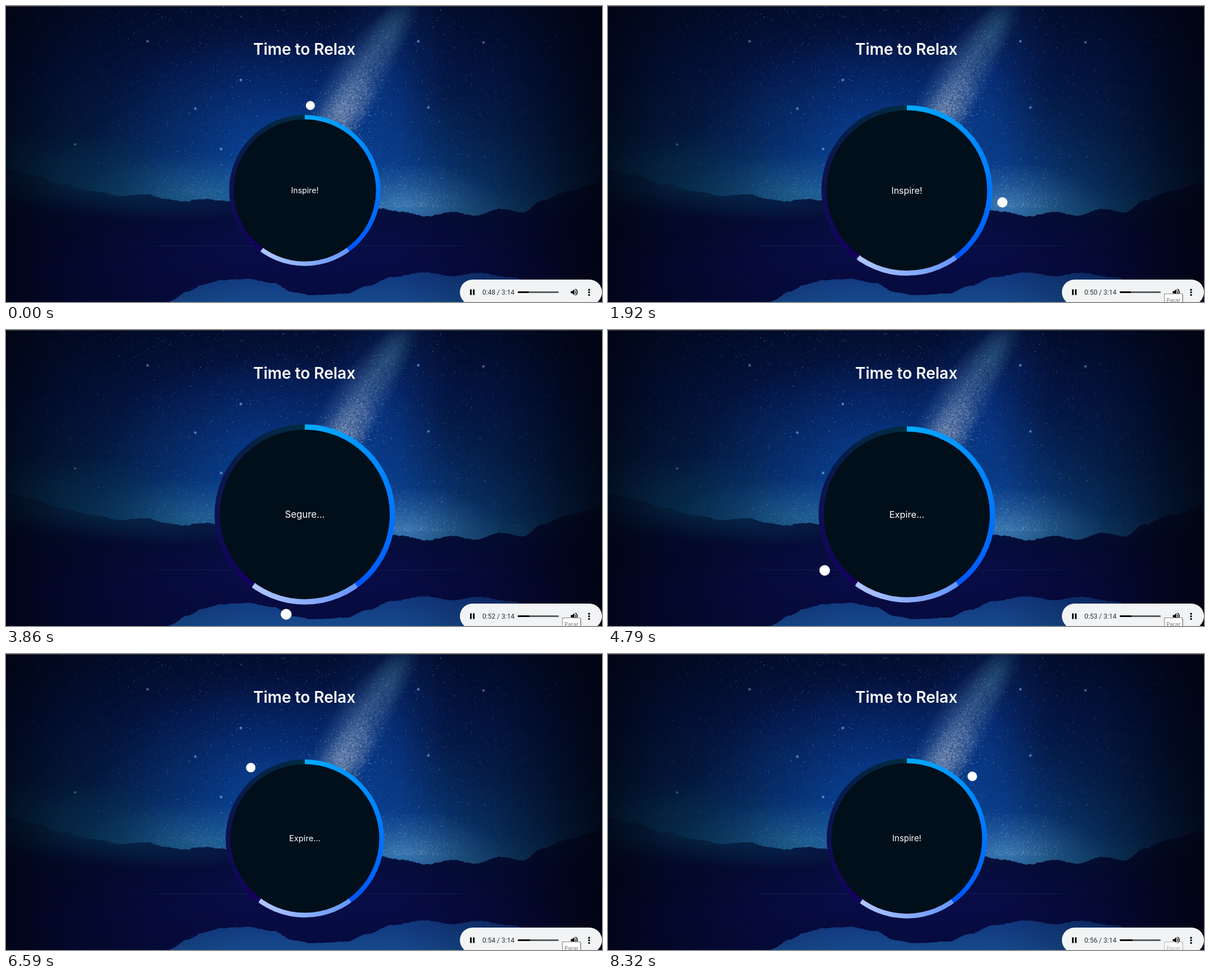
Write an HTML page with a canvas that moves like this. It is 1061x528 px and loops after 8390 ms.

```html
<!DOCTYPE html>
<html lang="en">
<head>
<meta charset="utf-8">
<title>Time to Relax</title>
<style>
  html, body { margin: 0; width: 100%; height: 100%; overflow: hidden; background: #020716; }
  #stage { position: relative; width: 1061px; height: 528px; overflow: hidden; font-family: Inter, sans-serif; color: #fff; }
  #stage * { position: absolute; box-sizing: border-box; white-space: nowrap; }
  h1 { left: 0; top: 60px; width: 1062px; margin: 0; text-align: center; font-size: 28px; line-height: 34px; font-weight: 600; }
  #breath { left: 531.7px; top: 328.7px; width: 0; height: 0; }
  .ring, .disc { border-radius: 50%; }
  .ring {
    left: -134.2px; top: -134.2px; width: 268.4px; height: 268.4px;
    background: conic-gradient(#00aaff 0%, #0055ff 40%, #6695fb 40%, #b0c6ff 60%, #15005c 60%, #002c40 100%);
  }
  .disc { left: -125.8px; top: -125.8px; width: 251.6px; height: 251.6px; background: #000f1a; }
  #word { left: -100px; top: -10px; width: 200px; text-align: center; font-size: 14px; line-height: 20px; }
  #hand { left: 0; top: 0; width: 0; height: 0; }
  #hand i { left: -8.4px; top: -159.4px; width: 16.8px; height: 16.8px; border-radius: 50%; background: #fff; }
  #player { left: 808px; top: 488px; width: 253px; height: 45px; border-radius: 22.5px; background: #f1f3f4; }
  #clock { left: 40px; top: 15px; font: 12px/16px Roboto, sans-serif; color: #303134; }
  .track { left: 103px; top: 21px; width: 73px; height: 3.4px; border-radius: 2px; background: #5b5c5d; }
  #played { left: 0; top: 0; height: 3.4px; border-radius: 2px; background: #000; }
  #player svg { left: 0; top: 0; }
  #tip { height: 22px; border: 1px solid #8a8a8a; background: #fff; color: #686868; font: 10px/23px "Open Sans", sans-serif; text-align: center; box-shadow: 1px 1px 2px #0004; }
</style>
</head>
<body>
<div id="stage">
  <canvas id="scene" width="1061" height="528"></canvas>
  <h1>Time to Relax</h1>
  <div id="breath">
    <div class="ring"></div>
    <div class="disc"></div>
    <div id="word"></div>
    <div id="hand"><i></i></div>
  </div>
  <div id="player">
    <svg width="253" height="45">
      <path d="M18 17.5h3v10h-3zM23.2 17.5h3v10h-3z"/>
      <path d="M197.5 20.5h2.8l3.5-3.5v11l-3.5-3.5h-2.8z"/>
      <path d="M205.3 20a3.2 3.2 0 0 1 0 5M205.3 17.2a5.6 5.6 0 0 1 0 10.6" fill="none" stroke="#000" stroke-width="1.4"/>
      <circle cx="230" cy="18.2" r="1.7"/><circle cx="230" cy="22.8" r="1.7"/><circle cx="230" cy="27.4" r="1.7"/>
    </svg>
    <div id="clock"></div>
    <div class="track"><div id="played"></div></div>
  </div>
  <div id="tip"></div>
</div>
<script>
const W = 1061, H = 528;
const $ = id => document.getElementById(id);
const c = $('scene').getContext('2d');

let seed = 7;
const rnd = () => (seed = (seed * 16807) % 2147483647) / 2147483647;
const bell = () => rnd() + rnd() + rnd() - 1.5;

function fade(x0, y0, x1, y1, stops) {
  const g = c.createLinearGradient(x0, y0, x1, y1);
  stops.forEach(([at, color]) => g.addColorStop(at, color));
  return g;
}

function glow(x, y, rx, ry, rgb, alpha, turn = 0) {
  c.save();
  c.translate(x, y);
  c.rotate(turn);
  c.scale(rx, ry);
  const g = c.createRadialGradient(0, 0, 0, 0, 0, 1);
  g.addColorStop(0, `rgba(${rgb},${alpha})`);
  g.addColorStop(0.5, `rgba(${rgb},${alpha * 0.45})`);
  g.addColorStop(1, `rgba(${rgb},0)`);
  c.fillStyle = g;
  c.fillRect(-1, -1, 2, 2);
  c.restore();
}

// Fills from a rough ridge line down to the bottom edge.
function ridge(points, fill, rough) {
  c.beginPath();
  c.moveTo(points[0][0], H);
  for (let i = 1; i < points.length; i++) {
    const [x0, y0] = points[i - 1], [x1, y1] = points[i];
    for (let x = x0; x < x1; x += 3) {
      const k = (x - x0) / (x1 - x0), s = k * k * (3 - 2 * k);
      c.lineTo(x, y0 + (y1 - y0) * s + (rnd() - 0.5) * rough);
    }
  }
  c.lineTo(points[points.length - 1][0], H);
  c.fillStyle = fill;
  c.fill();
}

function speck(x, y, size, color) {
  c.fillStyle = color;
  c.fillRect(x, y, size, size);
}

function drawSky() {
  c.fillStyle = fade(0, 0, 0, 380, [[0, '#030d2e'], [0.3, '#04174a'], [0.6, '#062659'], [0.85, '#0a3a70'], [1, '#14507e']]);
  c.fillRect(0, 0, W, H);
  glow(480, 270, 340, 230, '10,78,185', 0.65);
  glow(665, 150, 120, 240, '12,75,175', 0.4, 0.25);
  glow(720, 300, 170, 150, '12,70,165', 0.3);
  glow(340, 335, 250, 70, '55,130,175', 0.55);
  glow(715, 355, 170, 75, '85,150,205', 0.6);
  glow(90, 285, 230, 60, '8,80,115', 0.5);
}

function drawMilkyWay() {
  glow(622, 135, 165, 50, '115,150,190', 0.5, -1.0);
  glow(600, 190, 85, 42, '170,180,205', 0.5, -0.9);
  glow(685, 45, 90, 34, '55,115,145', 0.4, -1.0);
  for (let i = 0; i < 3600; i++) {
    const k = Math.sqrt(rnd()), off = bell() * (18 + 34 * k);
    const x = 708 - 118 * k + off * 0.8, y = 5 + 215 * k + off * 0.55;
    const dark = rnd() < 0.4;
    speck(x, y, 1 + rnd(), dark ? `rgba(10,40,95,${rnd() * 0.55})` : `rgba(190,205,215,${rnd() * 0.35 * (0.3 + k)})`);
  }
}

function drawStars() {
  for (let i = 0; i < 9000; i++) {
    const dark = rnd() < 0.35;
    speck(rnd() * W, rnd() * 365, 0.7 + rnd() * 0.9, dark ? `rgba(2,12,50,${rnd() * 0.5})` : `rgba(70,140,225,${0.08 + rnd() * 0.42})`);
  }
  for (let i = 0; i < 480; i++) {
    speck(rnd() * W, rnd() * 365, 0.9 + rnd() * 0.7, `rgba(120,185,240,${0.2 + rnd() * 0.5})`);
  }
  for (let i = 0; i < 1200; i++) {
    const right = rnd() < 0.6;
    speck((right ? 715 : 350) + bell() * 95, 358 - rnd() * rnd() * 85, 1 + rnd() * 0.5, `rgba(165,195,215,${rnd() * 0.5})`);
  }
  [[252, 63], [123, 247], [337, 183], [418, 132], [469, 72], [734, 63], [850, 65], [752, 181], [383, 255]]
    .forEach(([x, y]) => { glow(x, y, 3.5, 3.5, '130,195,245', 0.8); speck(x - 0.7, y - 0.7, 1.4, '#a4d0f4'); });
}

function drawLake() {
  const land = fade(0, 300, 0, H, [[0, '#051d47'], [0.2, '#05143f'], [0.35, '#050d3a'], [0.55, '#060b3b'], [0.72, '#070b42'], [1, '#060b3e']]);
  ridge([[0, 291], [45, 301], [100, 318], [160, 331], [205, 339], [250, 336], [285, 344], [315, 349], [350, 344], [385, 347],
    [440, 360], [620, 360], [665, 361], [705, 367], [748, 375], [795, 367], [832, 374], [880, 362], [920, 368], [955, 347],
    [1000, 330], [1062, 314]], land, 2);
  // Mist over the left shore
  glow(130, 325, 300, 48, '12,75,115', 0.6, 0.12);
  glow(530, 425, 430, 55, '12,14,90', 0.45);
  c.fillStyle = fade(0, 0, W, 0, [[0, '#0a305000'], [0.3, '#0d385255'], [0.7, '#0d385255'], [1, '#0a305000']]);
  c.fillRect(0, 427, W, 1.5);
  const water = fade(0, 470, 0, H, [[0, '#10357c'], [1, '#17498c']]);
  ridge([[290, 527], [325, 509], [350, 497], [385, 489], [430, 487], [475, 494], [510, 510], [545, 516], [605, 513],
    [645, 499], [685, 484], [745, 475], [795, 482], [840, 476], [900, 484], [960, 502], [1062, 522]], water, 1.5);
  for (let i = 0; i < 260; i++) {
    c.fillStyle = `rgba(20,55,130,${rnd() * 0.12})`;
    c.fillRect(rnd() * W, 432 + rnd() * 96, 10 + rnd() * 40, 1);
  }
}

function drawScene() {
  drawSky();
  drawMilkyWay();
  drawStars();
  drawLake();
  // Edge shading
  c.fillStyle = fade(0, 0, W, 0, [[0, 'rgba(1,3,14,.78)'], [0.1, 'rgba(1,4,18,.5)'], [0.27, 'rgba(1,4,20,.14)'], [0.4, 'rgba(1,4,20,0)'],
    [0.66, 'rgba(1,4,20,0)'], [0.82, 'rgba(1,4,20,.28)'], [0.93, 'rgba(1,3,16,.68)'], [1, 'rgba(1,3,14,.88)']]);
  c.fillRect(0, 0, W, H);
  c.fillStyle = '#43474f';
  c.fillRect(0, 0, W, 1);
}

const LOOP = 8390;
const RUNS = [70, 930, 1790, 2650, 3530, 4390, 5260, 6130, 6990, 7860];
const STEPS_PER_RUN = 13;

// The picture advances about 15 times a second, in runs of 13 steps.
function stepAt(t) {
  const run = RUNS.filter(start => start <= t).length - 1;
  if (run < 0) return 0;
  const inRun = Math.min(STEPS_PER_RUN - 1, Math.floor((t - RUNS[run] + 9) / 66.5));
  return 1 + run * STEPS_PER_RUN + inRun;
}

const clamp = v => Math.max(0, Math.min(1, v));

function breathe(step) {
  const angle = (3.7 + 3.222 * step) % 360;
  const ms = angle / 360 * 7500;
  const size = ms < 4500 ? clamp(ms / 3000) : 1 - clamp((ms - 4500) / 3000);
  $('breath').style.transform = `scale(${1 + 0.2 * size})`;
  $('hand').style.transform = `rotate(${angle}deg)`;
  $('word').textContent = ms < 3000 ? 'Inspire!' : ms < 4500 ? 'Segure...' : 'Expire...';
}

function play(step) {
  const sec = 48.3 + step * 0.0666;
  $('clock').textContent = `0:${Math.floor(sec)} / 3:14`;
  $('played').style.width = 73 * sec / 194 + 1.5 + 'px';
}

function hint(step) {
  const first = step < 22;
  const shown = first ? clamp((step - 6) / 3) : Math.min(clamp((step - 20) / 3), clamp((127 - step) / 4));
  const tip = $('tip');
  tip.textContent = first ? 'Pausar' : 'Parar';
  tip.style.left = (first ? 981 : 990) + 'px';
  tip.style.top = (first ? 510 : 513) + 'px';
  tip.style.width = (first ? 40 : 33) + 'px';
  tip.style.opacity = shown;
}

const begin = performance.now();
function tick() {
  const step = stepAt((performance.now() - begin) % LOOP);
  breathe(step);
  play(step);
  hint(step);
  requestAnimationFrame(tick);
}

drawScene();
tick();
</script>
</body>
</html>
```
